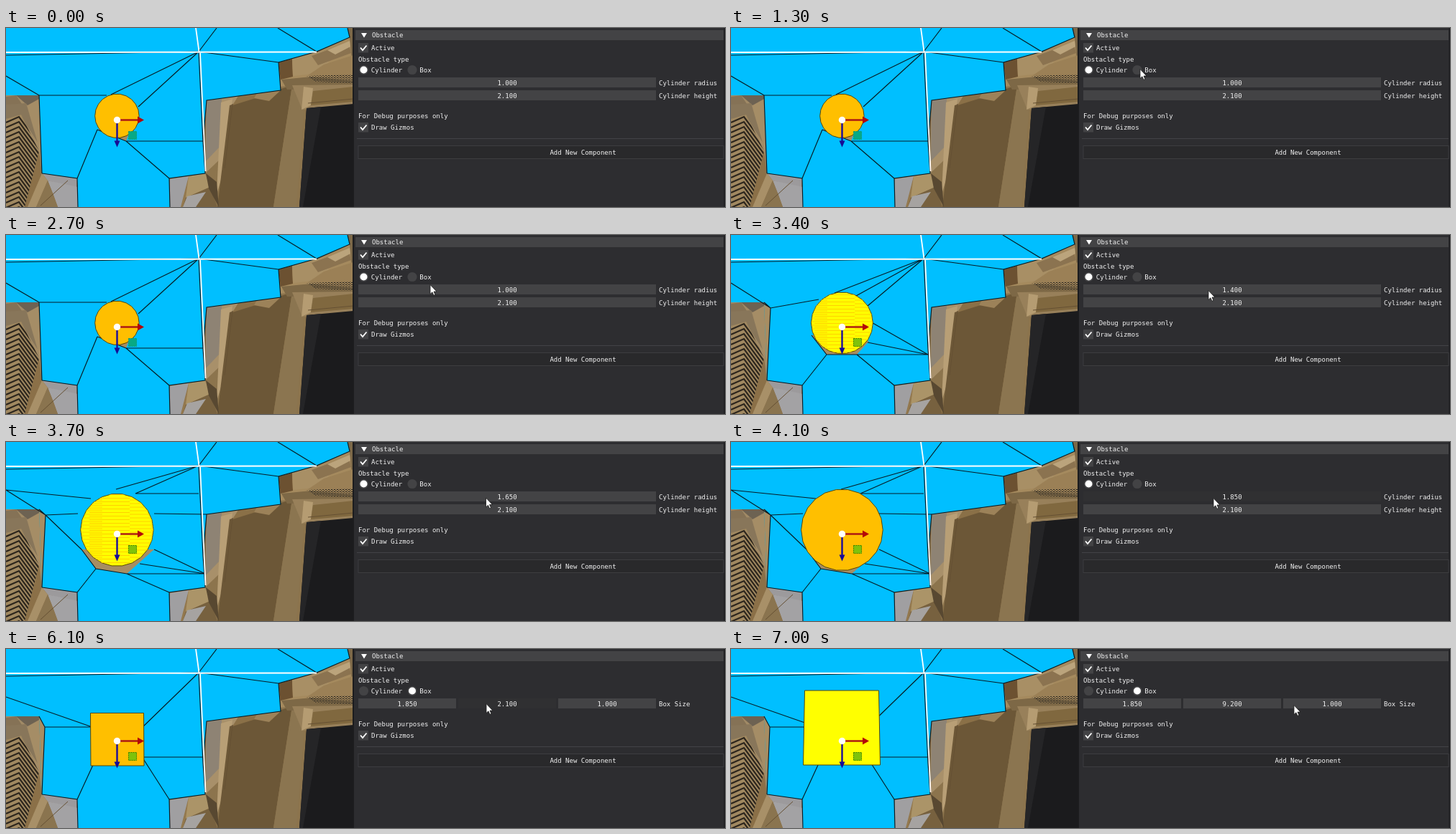
Animation of 1000x250 px, one loop 7100 ms. Source, as an HTML page:

```html
<!DOCTYPE html>
<html lang="en">
<head>
<meta charset="utf-8">
<title>Obstacle editor</title>
<style>
  html, body { margin: 0; width: 100%; height: 100%; overflow: hidden; background: #2d2d30; }
  svg { display: block; width: 1000px; height: 250px; }
  text { font: 9px "DejaVu Sans Mono", "Liberation Mono", monospace; fill: #f2f2f2; white-space: pre; }
</style>
</head>
<body>
<svg id="stage" viewBox="0 0 1000 250">
  <defs>
    <clipPath id="view"><rect width="483" height="250"/></clipPath>
    <clipPath id="grate"><path d="M0 127L21 121L46 172L26 250H0Z"/></clipPath>
    <pattern id="dots" width="4" height="3" patternUnits="userSpaceOnUse">
      <path d="M0 .5h2M2 2h1.5" stroke="#292621"/>
    </pattern>
    <pattern id="fight" width="86" height="5" patternUnits="userSpaceOnUse">
      <path d="M0 1h48M30 3.5h56" stroke="#ffc400" stroke-width=".8"/>
    </pattern>
  </defs>
  <g clip-path="url(#view)">
    <rect width="483" height="250" fill="#7c6848"/>
    <g id="room"></g>
    <path fill="#00bfff" d="M0 0H475L478 13L432 33L379 48L382 87L279 101L274 159L277 203L227 210L228 250H100L99 210L50 203L46 94H0Z"/>
    <path id="gap" fill="#a78d62"/>
    <path id="edges" fill="none" stroke="#071b24" stroke-width="1.15"/>
    <path id="mesh" fill="none" stroke="#071b24" stroke-width="1.15"/>
    <path d="M0 34L432 33.500M264 0L268.500 33M270 35L277.500 200" fill="none" stroke="#fff" stroke-width="1.8"/>
    <path id="shape" stroke="#5a4700" stroke-width="1"/>
    <path id="shimmer" fill="url(#fight)"/>
    <g id="gizmo">
      <rect id="handle" x="170.5" y="144.5" width="11" height="11" stroke-dasharray="2 1"/>
      <path d="M158 128.5H184" stroke="#a91414" stroke-width="2.4"/>
      <path d="M183 123.5L192 128.5L183 133.5Z" fill="#b40808"/>
      <path d="M154.5 132V159" stroke="#1a0c9b" stroke-width="2.4"/>
      <path d="M150.5 157.5H158.5L154.5 166.5Z" fill="#170b94"/>
      <circle cx="154.5" cy="128.5" r="4.7" fill="#fff"/>
    </g>
  </g>
  <rect x="482" width="518" height="250" fill="#2d2d30"/>
  <path d="M483 0V250M999.5 0V250" stroke="#1c1c1e" stroke-width="2"/>
  <g id="panel"></g>
  <path id="cursor" d="M0 .5V13.500L2.900 10.800L5 15.300L7 14.400L5 10H9Z" fill="#fff" stroke="#1a1a1a" stroke-width=".8"/>
</svg>
<script>
const $ = id => document.getElementById(id);
const LOOP = 7100, STEP = 100;
const mix = (a, b, k) => a + (b - a) * k;

// Piecewise interpolation over [time, value...] keys
function track(keys, t) {
  if (t <= keys[0][0]) return keys[0].slice(1);
  for (let i = 1; i < keys.length; i++) {
    const a = keys[i - 1], b = keys[i];
    if (t <= b[0]) {
      const k = (t - a[0]) / (b[0] - a[0]);
      return a.slice(1).map((v, j) => mix(v, b[j + 1], k));
    }
  }
  return keys[keys.length - 1].slice(1);
}

const pointer = [
  [100, 998, 150], [700, 640, 100], [1000, 640, 100], [1300, 569, 57],
  [1800, 569, 57], [2200, 499, 59], [2400, 499, 59], [2700, 590, 69],
  [3100, 655, 75], [3400, 664, 77], [4000, 671, 78], [4100, 671, 78],
  [4200, 671, 79], [4500, 671, 80], [4800, 567, 58], [5600, 567, 58],
  [6000, 668, 76], [6100, 668, 76], [7000, 783, 78]
];
const radiusKeys = [[3100, 1], [3400, 1.4], [4000, 1.85]];
const sizeKeys = [[6100, 2.1], [7000, 9.2]];

const poly = (points, fill) => `<path d="M${points}Z" fill="${fill}"/>`;

function drawRoom() {
  const parts = [
    // left wall and crates
    ["0 94L46 94L50 203L0 190", "#a18a66"],
    ["0 96L14 94L26 112L0 122", "#857256"],
    ["14 94L46 94L47 107L30 108", "#6d6252"],
    ["30 108L46 99L49 170L40 158", "#a58d66"],
    ["0 107L28 105L44 160L20 122L0 128", "#88765a"],
    ["0 127L21 121L46 172L26 250L0 250", "#a08860"],
    ["46 172L50 203L100 210L100 250L26 250", "#8b7048"],
    ["50 203L99 210L98 224L58 213", "#9c9a9c"],
    ["50 203L58 213L42 250L30 250", "#a89068"],
    ["58 213L100 222L100 250L72 250L66 233", "#a3a2a4"],
    ["58 213L72 250L42 250", "#8a744f"],
    // right pillar and panel
    ["279 101L382 87L379 48L478 10L483 250L227 250L227 210L277 203", "#8c744d"],
    ["279 101L323 95L300 181L277 203", "#a8906a"],
    ["279 101L300 99L297 166L278 186", "#8e8374"],
    ["299 104L315 99L304 196L293 232", "#b89f76"],
    ["315 106L354 88L381 87L372 95L323 108", "#a08860"],
    ["311 108L398 80L372 250L294 250", "#6c5737"],
    ["323 95L367 82L366 92L315 108", "#8a7047"],
    ["354 82L382 87L366 102L345 98", "#9c8259"],
    ["398 80L417 82L404 250L372 250", "#8b7550"],
    ["227 210L278 203L294 250L228 250", "#93784e"],
    ["228 211L254 207L243 250L228 250", "#a09fa1"],
    ["254 207L277 203L284 222L250 237", "#ab9468"],
    ["250 237L284 222L294 250L246 250", "#77613f"],
    ["252 235L278 229L264 250L246 250", "#a6a3a1"],
    ["278 203L293 215L296 250L282 224", "#584831"],
    // upper right shelves
    ["379 48L432 33L478 13L483 70L382 82", "#a58a5e"],
    ["379 48L398 43L399 68L382 72", "#6c5131"],
    ["398 43L452 29L446 62L399 67", "#a88f65"],
    ["425 39L476 20L480 35L434 52", "#8b7350"],
    ["447 31L478 18L479 26L458 37", "#bba47c"],
    ["420 66L442 51L483 38L483 76", "#9b8056"],
    ["383 72L425 68L483 74L483 84L391 86", "#7d6846"],
    ["398 80L483 79L483 108L412 114", "#98805a"],
    ["414 82L427 84L424 108L411 114", "#b59c72"],
    ["427 88L483 82L483 103L424 108", "#80683f"],
    // dark doorway
    ["418 112L483 106L483 250L408 250", "#1b1b1d"],
    ["418 112L438 110L413 250L408 250", "#252527"]
  ];
  let hatch = "";
  for (let y = 132; y < 310; y += 7) hatch += `M0 ${y}L18 ${y - 8}L46 ${y + 30}`;
  $("room").innerHTML = parts.map(p => poly(...p)).join("") +
    `<path clip-path="url(#grate)" d="${hatch}" fill="none" stroke="#2d261d" stroke-width="2.2"/>` +
    '<path d="M418 67L483 65V77L430 75Z" fill="url(#dots)"/>' +
    '<path d="M48 248L86 213M304 196L315 106M420 105L483 99" stroke="#655033" fill="none"/>';
}

const fixedEdges =
  "M0 38L268 33L293 0M378 0L432 33L478 13L475 0" +
  "M432 33L379 48L382 87L279 101L274 159M268 33L379 48M268 33L274 159L277 203L227 210L228 250" +
  "M100 250L99 210L50 203";

// Walkable polygons around each obstacle, and the floor left bare beside it
const meshes = {
  small: {
    lines: "M50 203L46 94H140M0 67L46 94M268 33L146 93M268 33L184 110M127 142L99 210" +
      "M127 142L167 158H274M167 158L227 210",
    bare: "M127 142L167 158L172 145L140 140Z"
  },
  medium: {
    lines: "M0 67L55 102L122 90M46 94L55 102L50 203M268 33L144 81M268 33L174 85" +
      "M268 33L190 99M192 120L274 167M190 150L274 167M112 140L133 167H274M133 167L99 210M175 167L227 210",
    bare: "M46 94L55 102L50 203ZM112 140L133 167H175L192 148Z"
  },
  large: {
    lines: "M0 67L118 79M0 67L55 102L100 100M46 94L55 102L50 203M55 102L105 150" +
      "M268 33L153 66M268 33L180 72H268M206 100L279 101M206 150L277 184M186 170L277 184" +
      "M105 150L125 177L168 184H277M125 177L99 210M168 184L227 210",
    bare: "M46 94L55 102L50 203ZM105 150L125 177L168 184L206 150Z"
  },
  box: {
    lines: "M0 67L117 108M46 94L54 109H118M54 109L50 203M268 33L190 109M190 151H274" +
      "M121 162L99 210M190 152L227 210",
    bare: "M46 94L54 109L50 203Z"
  }
};

function disc(r) {
  const n = 22, pts = [];
  for (let i = 0; i < n; i++) {
    const a = i / n * Math.PI * 2;
    pts.push(`${(154.4 + r * Math.cos(a)).toFixed(1)} ${(122.8 + r * Math.sin(a)).toFixed(1)}`);
  }
  return `M${pts.join("L")}Z`;
}

function square(height) {
  // the top face grows as it nears the camera
  const width = 1 / mix(1 / 75, 1 / 106, (height - 2.1) / 7.1);
  const k = (width - 75) / 31;
  const at = (a, b) => mix(a, b, k).toFixed(1);
  return `M${at(117.5, 102.5)} ${at(89.5, 58)}L${at(191.5, 205.5)} ${at(89.5, 58)}` +
    `L${at(192, 207.5)} ${at(163, 162)}L${at(118, 100.5)} ${at(163, 162)}Z`;
}

const label = (x, y, s, mid) =>
  `<text x="${x}" y="${y}"${mid ? ' text-anchor="middle"' : ""}>${s}</text>`;
const box = (x, y, w, h, fill, extra = "") =>
  `<rect x="${x}" y="${y}" width="${w}" height="${h}" fill="${fill}" ${extra}/>`;

function field(x, y, w, value, at) {
  const hot = at && at[0] > x && at[0] < x + w && at[1] > y + 1 && at[1] < y + 14;
  return box(x, y, w, 14, hot ? "#303032" : "#434345") +
    label(x + w / 2, y + 10.5, value.toFixed(3), true);
}

function check(y, s) {
  return box(490, y, 14, 13.5, "#434345") +
    `<path d="M493 ${y + 6.5}L496 ${y + 10}L501.5 ${y + 3.5}" fill="none" stroke="#fff" stroke-width="1.8"/>` +
    label(508, y + 9.5, s);
}

function radio(x, s, on) {
  return `<circle cx="${x}" cy="58.5" r="6.6" fill="#434345"/>` +
    (on ? `<circle cx="${x}" cy="58.5" r="5" fill="#fff"/>` : "") + label(x + 10.3, 62, s);
}

function drawPanel(isBox, radius, height, at) {
  const dy = isBox ? -18 : 0;
  let html = box(486, 3, 512, 14, "#434345") +
    '<path d="M494 7H502L498 13.5Z" fill="#fff"/>' + label(509, 13.3, "Obstacle") +
    check(21, "Active") + label(490, 46.5, "Obstacle type") +
    radio(497.5, "Cylinder", !isBox) + radio(565, "Box", isBox);
  if (isBox) {
    html += [radius, height, 1].map((v, i) => field(490 + i * 139, 69, 136, v, at)).join("") +
      label(908, 79.5, "Box Size");
  } else {
    html += field(490, 69, 414, radius, at) + label(908, 79.5, "Cylinder radius") +
      field(490, 87, 414, 2.1, at) + label(908, 97.5, "Cylinder height");
  }
  html += label(490, 126 + dy, "For Debug purposes only") + check(132 + dy, "Draw Gizmos") +
    `<path d="M488 ${154.5 + dy}H998" stroke="#434347"/>` +
    box(490, 164.5 + dy, 508, 18, "#29292b", 'stroke="#3d3d40"') +
    label(802.5, 177 + dy, "Add New Component", true);
  $("panel").innerHTML = html;
}

function render(t) {
  const isBox = (t >= 1400 && t < 2300) || t >= 5000;
  const dragDisc = t > 3100 && t < 4000;
  const dragBox = t > 6100;
  const dragging = dragDisc || dragBox;
  const at = track(pointer, t);
  const radius = Math.round(track(radiusKeys, t)[0] * 20) / 20;
  const height = Math.round(track(sizeKeys, t)[0] * 20) / 20;
  const kind = isBox ? "box" : radius < 1.2 ? "small" : radius < 1.65 ? "medium" : "large";
  const outline = isBox ? square(height) : disc(30.7 * radius);

  $("mesh").setAttribute("d", meshes[kind].lines);
  $("gap").setAttribute("d", meshes[kind].bare);
  $("shape").setAttribute("d", outline);
  $("shape").setAttribute("fill", dragging ? "#ffff00" : "#ffbf00");
  $("shimmer").setAttribute("d", dragDisc ? outline : "");

  const covered = kind === "small";
  $("handle").setAttribute("fill", covered ? "#08a985" : "#7fc20b");
  $("handle").setAttribute("stroke", covered ? "#0b9b6c" : "#368400");

  drawPanel(isBox, radius, height, t > 0 && !dragging ? at : null);
  $("cursor").setAttribute("transform", `translate(${at[0].toFixed(1)} ${at[1].toFixed(1)})`);
  $("cursor").setAttribute("visibility", t > 0 ? "visible" : "hidden");
}

drawRoom();
$("edges").setAttribute("d", fixedEdges);

let shown = -1;
const start = performance.now();
function tick(now) {
  const t = Math.floor(Math.max(0, now - start) % LOOP / STEP) * STEP;
  if (t !== shown) render(shown = t);
  requestAnimationFrame(tick);
}
render(shown = 0);
requestAnimationFrame(tick);
</script>
</body>
</html>
```
